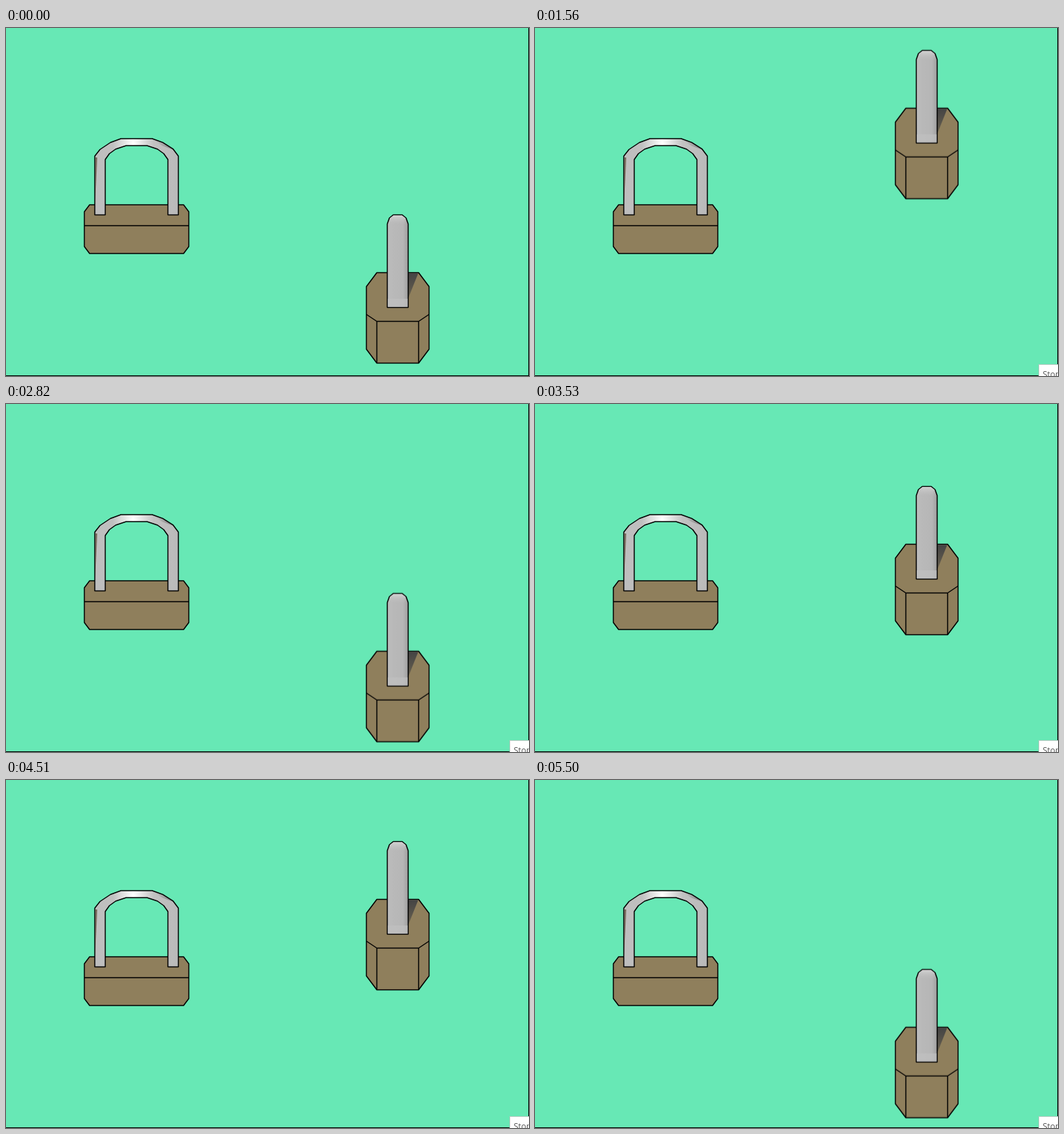
Write an HTML page without scripts that moves like this. It is 751 px wide and 500 px high and loops after 5570 ms.

```html
<!DOCTYPE html>
<html lang="en">
<head>
<meta charset="utf-8">
<title>Padlocks</title>
<style>
  html, body { margin: 0; width: 100%; height: 100%; overflow: hidden; background: #67e8b5; }
  svg { display: block; width: 751px; height: 500px; }
  .line { stroke: #000; stroke-width: 1.5; stroke-linejoin: round; }
  .brass { fill: #8f7f5c; }

  /* The lock moves 15px per 70ms step and bounces at both ends. */
  .bounce { animation: bounce 5570ms steps(1) infinite; }
  @keyframes bounce {
    0%      { transform: translateY(0); }
    1.256%  { transform: translateY(-15px); }
    5.206%  { transform: translateY(-30px); animation-timing-function: steps(3); }
    8.976%  { transform: translateY(-75px); }
    10.412% { transform: translateY(-93.75px); animation-timing-function: steps(11); }
    24.236% { transform: translateY(-258.75px); }
    25.852% { transform: translateY(-266.25px); animation-timing-function: steps(2); }
    28.007% { transform: translateY(-236.25px); animation-timing-function: steps(17); }
    49.371% { transform: translateY(18.75px); animation-timing-function: steps(3); }
    53.141% { transform: translateY(-26.25px); }
    54.578% { transform: translateY(-45px); animation-timing-function: steps(15); }
    73.429% { transform: translateY(-270px); animation-timing-function: steps(14); }
    91.023% { transform: translateY(-60px); }
    92.459% { transform: translateY(-41.25px); animation-timing-function: steps(4); }
    97.486% { transform: translateY(18.75px); }
    98.743%, 100% { transform: translateY(3.75px); }
  }

  .tip { animation: tip 5570ms steps(1) infinite; }
  @keyframes tip {
    0%      { opacity: 0; }
    12.926% { opacity: .33; }
    14.182% { opacity: .67; }
    15.439%, 100% { opacity: 1; }
  }
  .tip text { font: 12px "Open Sans", "Noto Sans", sans-serif; fill: #575757; }
</style>
</head>
<body>
<svg viewBox="0 0 751 500">
  <defs>
    <linearGradient id="arch" gradientUnits="userSpaceOnUse" x1="127" x2="248" y1="0" y2="0">
      <stop offset="0" stop-color="#bdbdbd"/>
      <stop offset=".22" stop-color="#c0c0c0"/>
      <stop offset=".46" stop-color="#fff"/>
      <stop offset=".7" stop-color="#c2c2c2"/>
      <stop offset="1" stop-color="#b9b9b9"/>
    </linearGradient>
    <linearGradient id="archShade" gradientUnits="userSpaceOnUse" x1="210" y1="160" x2="240" y2="174">
      <stop offset="0" stop-color="#aaa" stop-opacity="0"/>
      <stop offset="1" stop-color="#777"/>
    </linearGradient>
    <linearGradient id="bar">
      <stop offset="0" stop-color="#bebebe"/>
      <stop offset=".25" stop-color="#b9b9b9"/>
      <stop offset=".75" stop-color="#b6b6b6"/>
      <stop offset="1" stop-color="#9f9f9f"/>
    </linearGradient>
    <linearGradient id="barTop" x2="0" y2="1">
      <stop offset="0" stop-color="#d2d2d2"/>
      <stop offset="1" stop-color="#bbb" stop-opacity="0"/>
    </linearGradient>
    <linearGradient id="shadow" x2="0" y2="1">
      <stop offset="0" stop-color="#444"/>
      <stop offset="1" stop-color="#6a6250"/>
    </linearGradient>
  </defs>

  <rect width="751" height="500" fill="#67e8b5"/>

  <g class="line">
    <path class="brass" d="M120 254H255L262.5 264V314L255 324H120L112.5 314V264ZM112.5 284H262.5"/>
    <path fill="url(#arch)" d="M127.5 268.5V184L135 174.500L150 164.500L165 159H210L225 164.500L240 174L247.500 184V268.500H232.500V189L226.500 180.500L217.500 174L202.500 169H172.500L157.500 174L148.500 180.500L142.500 189V268.500Z"/>
    <path stroke="none" fill="url(#archShade)" d="M210 159.700L225 165.200L239.500 174.500L224 169Z"/>
    <path stroke="none" fill="#77685a" d="M128.200 186H131L128.200 250Z"/>
  </g>

  <g class="bounce line">
    <path class="brass" d="M532.5 351.5H592.5L607.5 371.5V461.5L592.5 481.5H532.5L517.5 461.5V371.5Z"/>
    <path stroke="none" fill="url(#shadow)" d="M577.5 352.2H592L577.5 388.500Z"/>
    <path fill="none" d="M517.5 411.5L532.5 421.5H592.5L607.5 411.5M532.5 421.5V481.5M592.5 421.5V481.5"/>
    <path fill="url(#bar)" d="M547.5 401.5V281.500L550.500 273L556 268.500H569L574.500 273L577.500 281.500V401.500Z"/>
    <path stroke="none" fill="url(#barTop)" d="M551.500 273L556.500 269.300H568.500L573.500 273L575 283H550Z"/>
    <path stroke="none" fill="#c0c0c0" opacity=".7" d="M548.300 389H576.700V400.700H548.300Z"/>
  </g>

  <path d="M750 0h1v500H0v-1h750z"/>

  <g class="tip">
    <rect x="723.5" y="483.5" width="40" height="30" fill="#fff" stroke="#b5c9c0"/>
    <text x="729" y="501.5">Stop</text>
  </g>
</svg>
</body>
</html>
```
